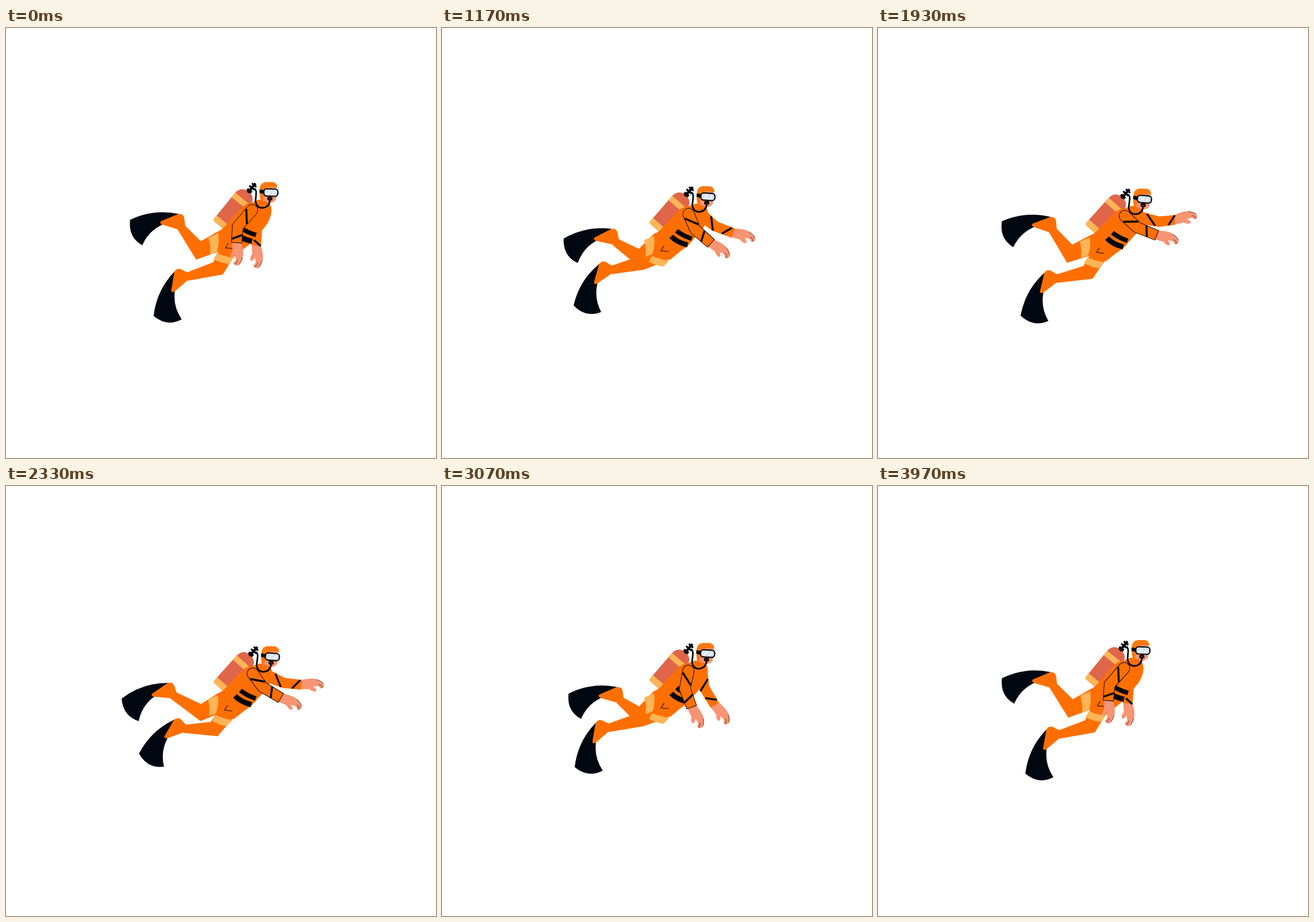
Write an HTML page that moves like this. It is 748 px wide and 748 px high and loops after 4010 ms.

```html
<!DOCTYPE html>
<html lang="en">
<head>
<meta charset="utf-8">
<title>Diver</title>
<style>
html, body { margin: 0; width: 100%; height: 100%; overflow: hidden; background: #fff; }
svg { display: block; width: 100vw; height: 100vh; }
.suit { fill: #ff6f00; }
.round { stroke: #ff6f00; stroke-width: 2; stroke-linejoin: round; }
.band { fill: #ffb557; }
.skin { fill: #f79473; }
.fin { fill: #020812; }
.line { fill: none; stroke: #05070c; stroke-linejoin: round; }
</style>
</head>
<body>
<svg viewBox="0 0 748 748">
  <g id="diver">
    <g transform="translate(359.5 334.5) rotate(39.3)">
      <path d="M0-4V-62Q1-78 17-78Q33-78 34-62V0H4Q0 0 0-4Z" fill="#e0664a"/>
      <path class="band" d="M0-11H34V0H4Q0 0 0-4ZM0-62H34V-52H0Z"/>
      <path class="line" d="M17-76V-97" stroke-width="4.5"/>
      <path class="line" d="M12-80H22" stroke-width="5"/>
      <path class="line" d="M11-87H23M12-93H22" stroke-width="3.2"/>
    </g>
    <g id="upperLeg"></g>
    <g id="lowerLeg"></g>
    <path class="band" d="M352 365L369 357Q372 374 367 389L355 394Q357 380 352 365ZM367 392Q381 398 397 399L387 410Q374 409 361 402Z"/>
    <g id="farArm"></g>
    <path class="suit" d="M430 303C440 296 455 297 460 308C464 318 461 331 452 344L441 357L429 372Q412 385 398 398L378 387L372 353L380 346L412 310Q420 304 430 303Z"/>
    <g class="line">
      <path d="M408 347Q418 355 435 360" stroke-width="8"/>
      <path d="M399 357Q409 367 428 371" stroke-width="9"/>
      <path d="M387 374L381.5 382.5L395 383.5" stroke-width="1"/>
    </g>
    <path class="skin" d="M447 275H470V297Q467 304 460 304L445 300Z"/>
    <path fill="#ff780d" d="M443 299Q440 290 442 276Q444 269 452 268H465Q472 270 472 278Q460 275 453 279Q449 283 449 291L447 300Z"/>
    <path d="M441 281L450 282V289L441 287Z" fill="#05070c"/>
    <g transform="rotate(2 461 286)">
      <rect x="448.5" y="280" width="24.5" height="12.5" rx="5" fill="#d7e3ec" stroke="#05070c" stroke-width="2.2"/>
      <path d="M454 290L461 282M463 290L468 284" stroke="#fff" stroke-width="1.5"/>
    </g>
    <path class="line" d="M432 279Q436 282 435 290L434 302Q436 313 446 313Q458 312 459 300" stroke-width="2.8"/>
    <rect x="454.5" y="293.5" width="9" height="6.5" rx="3" fill="#05070c"/>
    <path d="M457 297H461" stroke="#a33c2c"/>
    <g id="nearArm"></g>
  </g>
</svg>
<script>
const LOOP = 4010, TURN = 2 * Math.PI, RAD = Math.PI / 180;
const ARM_LEAD = 130;

const add = (p, q, k = 1) => [p[0] + q[0] * k, p[1] + q[1] * k];
const sub = (p, q) => add(p, q, -1);
const unit = p => { const l = Math.hypot(...p); return [p[0] / l, p[1] / l]; };
const normal = (p, q) => { const [x, y] = unit(sub(q, p)); return [y, -x]; };
const text = p => p.map(v => v.toFixed(2)).join(' ');
const $ = id => document.getElementById(id);

// Rises from 0 to 1 and falls back once per loop.
const swell = now => (1 - Math.cos(now / LOOP * TURN)) / 2;

// Two-part tapered limb, capped at its root and mitred at the joint.
function limb([a, b, c], [ra, rb, rc]) {
  const n1 = normal(a, b), n3 = normal(b, c), n2 = unit(add(n1, n3));
  const mitre = rb / Math.max(.7, n1[0] * n2[0] + n1[1] * n2[1]);
  const pt = (p, n, r) => text(add(p, n, r));
  return `M${pt(c, n3, -rc)}L${pt(b, n2, -mitre)}L${pt(a, n1, -ra)}` +
    `A${ra} ${ra} 0 0 1 ${pt(a, n1, ra)}L${pt(b, n2, mitre)}L${pt(c, n3, rc)}Z`;
}

// Line across a limb, each end given as distance along and to the side.
function stripe(p, q, along1, side1, along2, side2) {
  const n = normal(p, q), d = unit(sub(q, p));
  const at = (along, side) => text(add(add(p, d, along), n, side));
  return `M${at(along1, side1)}L${at(along2, side2)}`;
}

// Two kicks per loop: spread, glide, tuck, glide. The ankles scissor before the tuck.
function makeLeg(id, hip, radii, scissor, { spread, glide, tuck }) {
  const g = $(id);
  g.innerHTML = `<g>
      <path class="fin" d="M-88-12.5Q-47-32-3-22.5L-32-4Q-56 7-67 32Q-92 18-88-12.5Z"/>
      <path class="suit round" d="M-34-9L-5-21Q3-23 5-16L7 0L-6 3L-32-5Q-36-7-34-9Z"/>
    </g><path class="suit round"/>`;
  const [foot, leg] = g.children;
  return now => {
    const phase = now / LOOP * 2 * TURN, w = Math.cos(phase);
    const [kx, ky, ax, ay, angle] = glide.map((v, i) =>
      v + w * (spread[i] - tuck[i]) / 2 + w * w * ((spread[i] + tuck[i]) / 2 - v));
    const cross = scissor * Math.sin(phase) * w * (w - 1) / 2;
    const ankle = add([ax, ay], [15, 11], cross);
    foot.setAttribute('transform', `translate(${text(ankle)}) rotate(${angle})`);
    leg.setAttribute('d', limb([hip, [kx, ky], ankle], radii));
  };
}

// Poses hold upper arm angle and length, then forearm angle and length.
// Halfway through the swing the elbow slides up towards the shoulder.
function makeArm(id, shoulder, radii, outline, marks, slide, rest, reach) {
  const g = $(id);
  g.innerHTML = `<g><path class="skin" d="M-8-2L-6 15Q-11 22-8 27Q-4 28-1 21L1 30L-3 35Q-1 41 5 39Q11 36 13 22Q13 12 8-2Z"/>
    <path class="line" stroke-width=".6" d="M-1 37Q4 35 4 30M6 38Q10 35 12 25"/></g>
    <path class="suit" ${outline ? 'stroke="#05070c" stroke-width="1"' : ''}/>
    <path class="line" stroke-width="3.4"/>`;
  const [hand, sleeve, stripes] = g.children;
  const extend = (p, angle, len) => add(p, [Math.sin(angle * RAD), Math.cos(angle * RAD)], len);
  return now => {
    const s = swell(now + ARM_LEAD), shift = slide * 4 * s * (1 - s);
    const [a1, l1, a2, l2] = rest.map((v, i) => v + (reach[i] - v) * s);
    const elbow = extend(shoulder, a1, l1 - shift), wrist = extend(elbow, a2, l2 + shift);
    hand.setAttribute('transform', `translate(${text(wrist)}) rotate(${-a2})`);
    sleeve.setAttribute('d', limb([shoulder, elbow, wrist], radii));
    stripes.setAttribute('d', stripe(shoulder, elbow, ...marks[0]) + stripe(elbow, wrist, ...marks[1]));
  };
}

// Leg poses hold knee, ankle and foot turn.
const parts = [
  makeLeg('upperLeg', [378, 368], [16, 12, 6], 1, {
    spread: [335, 387, 304, 346, 0],
    glide: [344.5, 391, 289, 372, -20],
    tuck: [344, 397.5, 312.5, 372, -1.5]
  }),
  makeLeg('lowerLeg', [386, 387], [13, 11.5, 6], -1, {
    spread: [369, 418, 314, 433, -58],
    glide: [360, 413, 304.5, 408.5, -33],
    tuck: [347, 403, 286.5, 418, -60]
  }),
  makeArm('farArm', [450, 318], [11, 9, 8.5], false,
    [[33, -8, 15, 9], [16, -8, 29, 8]], 8, [-24, 35, -4, 28], [81, 38, 99, 28]),
  makeArm('nearArm', [428, 317], [10, 9.5, 9], true,
    [[5, -9, 24, 9], [22, -9, 14, 9]], 3, [-42, 38, -5, 28], [50, 29, 71, 37])
];

function draw(now) {
  $('diver').setAttribute('transform', `rotate(${2.7 * swell(now)} 215 350)`);
  parts.forEach(part => part(now));
}

const start = performance.now();
function tick() {
  draw((performance.now() - start) % LOOP);
  requestAnimationFrame(tick);
}
tick();
</script>
</body>
</html>
```
